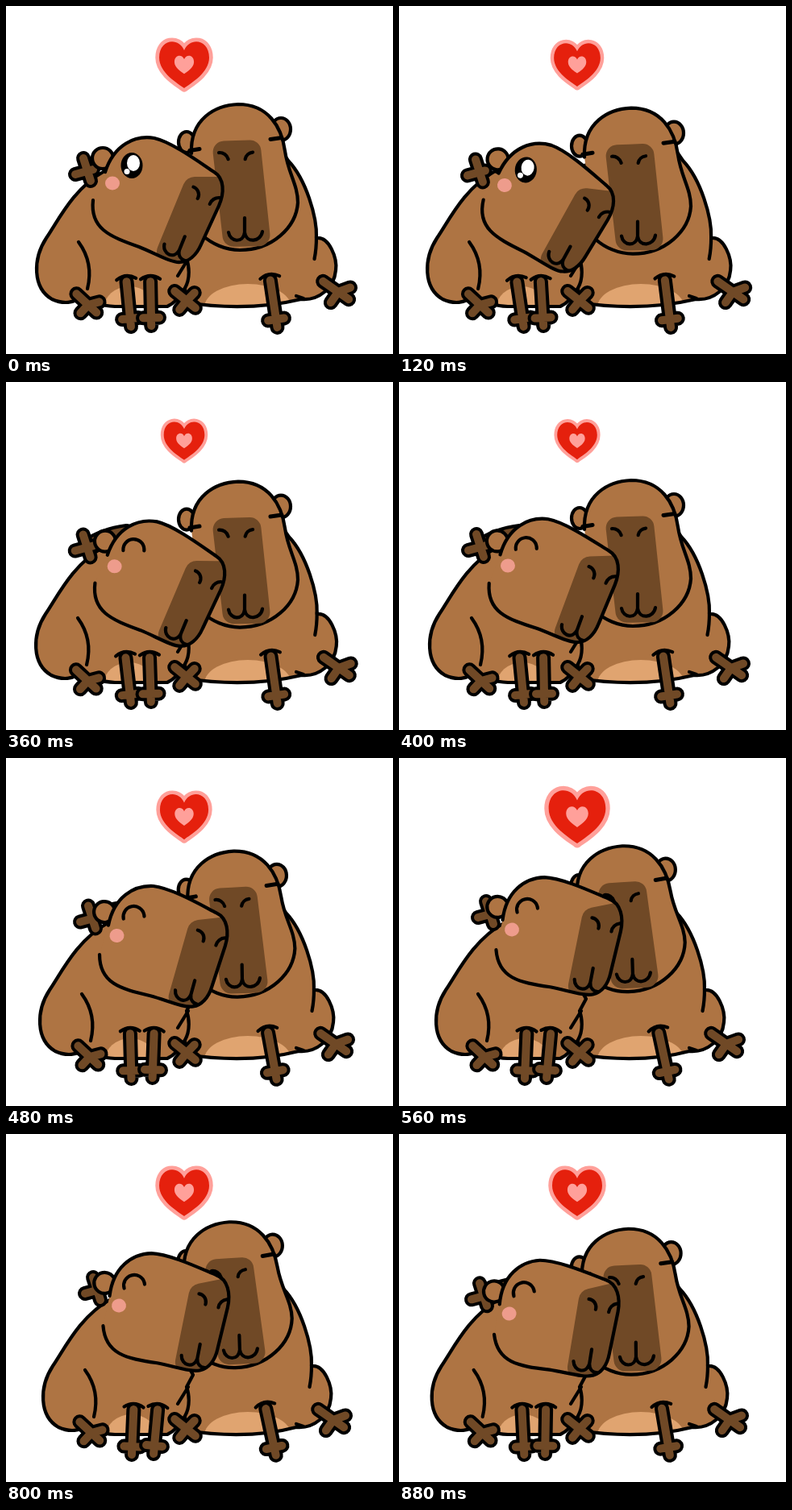
Animation of 480 by 432 pixels, one loop 920 ms. Source, as an HTML page with a canvas:

```html
<!DOCTYPE html>
<html lang="en">
<head>
<meta charset="utf-8">
<title>Cuddling capybaras</title>
<style>
html, body { margin: 0; width: 100%; height: 100%; overflow: hidden; background: #fff; }
canvas { display: block; }
</style>
</head>
<body>
<canvas id="stage" width="480" height="432"></canvas>
<script>
const ctx = document.getElementById('stage').getContext('2d');
const FUR = '#ae7443', DARK = '#704926', BELLY = '#e0a470', INK = '#000';
const RED = '#e5200d', PINK = '#ffa09a', CHEEK = '#ee9c8c';
const LOOP = 920, ASLEEP_FROM = 360;
const STEPS = [0, 120, 200, 360, 400, 480, 520, 560, 680, 800, 840, 880];
const rad = degrees => degrees * Math.PI / 180;

// Straight-line motion through [time, value] keys
function track(time, ...keys) {
  const next = keys.findIndex(([t]) => t > time);
  const [t0, v0] = keys[next - 1], [t1, v1] = keys[next];
  return v0 + (v1 - v0) * (time - t0) / (t1 - t0);
}

function fill(path, color) {
  ctx.fillStyle = color;
  ctx.fill(new Path2D(path));
}

function line(path, width = 4.2, color = INK) {
  ctx.lineWidth = width;
  ctx.strokeStyle = color;
  ctx.stroke(new Path2D(path));
}

function shape(path) {
  fill(path, FUR);
  line(path);
}

function oval(x, y, rx, ry, color) {
  const path = new Path2D();
  path.ellipse(x, y, rx, ry, 0, 0, Math.PI * 2);
  fill(path, color);
  return path;
}

const ear = (x, y, rx, ry) => line(oval(x, y, rx, ry, FUR));

function arc(x, y, r, from, to) {
  const path = new Path2D();
  path.arc(x, y, r, rad(from), rad(to));
  line(path);
}

function roundedPolygon(corners, radius) {
  const path = new Path2D();
  const [a, b] = [corners[0], corners[1]];
  path.moveTo((a[0] + b[0]) / 2, (a[1] + b[1]) / 2);
  corners.forEach((_, i) => {
    const n = corners.length;
    path.arcTo(...corners[(i + 1) % n], ...corners[(i + 2) % n], radius);
  });
  path.closePath();
  return path;
}

function within(path, draw) {
  ctx.save();
  ctx.clip(new Path2D(path));
  draw();
  ctx.restore();
}

function posed(x, y, degrees, draw, pivotX = 0, pivotY = 0) {
  ctx.save();
  ctx.translate(x, y);
  ctx.rotate(rad(degrees));
  ctx.translate(-pivotX, -pivotY);
  draw();
  ctx.restore();
}

function smile(x, y, degrees) {
  posed(x, y, degrees, () => line('M0,-18V0C-2,14-18,12-20,0M0,0C2,14 20,12 22,-1'));
}

function limb(path) {
  line(path, 18, INK);
  line(path, 10, DARK);
}

// A stem arriving at x, y in the given direction, spread into three toes
function foot(x, y, degrees, stem, toe, spread = 90) {
  const tip = (turn, r) => {
    const a = rad(degrees + turn);
    return `M${x},${y}l${r * Math.cos(a)},${r * Math.sin(a)}`;
  };
  limb(tip(180, stem) + tip(-spread, toe) + tip(0, toe) + tip(90, toe));
}

function leg(topX, topY, x, y) {
  const degrees = Math.atan2(y - topY, x - topX) / rad(1);
  foot(x, y, degrees, y - topY - 5, 10);
  posed(topX, topY, degrees - 90, () => line('M-12,2Q0,-6 12,2'));
}

function drawHeart(scale) {
  const half = 'M0,29C-8,23-31,10-31,-9C-31,-32-7,-35 0,-18';
  const both = new Path2D(half);
  both.addPath(new Path2D(half), new DOMMatrix([-1, 0, 0, 1, 0, 0]));
  ctx.save();
  ctx.translate(221, 73);
  ctx.scale(scale, scale);
  line(both, 9.5, PINK);
  fill(both, RED);
  ctx.scale(.39, .39);
  fill(both, PINK);
  ctx.restore();
}

function drawRightBody(shift) {
  const back = 385 + shift;
  const body = `M222,200L${back - 50},170l15,22c22,23 36,70 35,96
    c16,-2 26,25 24,40c-2,22 -21,38 -43,36Q300,380 222,368Z`;
  fill(body, FUR);
  within(body, () => oval(300, 374, 54, 29, BELLY));
  line(body);
  line(`M${back},286q0,16 -2.5,28M360,360l9,3`);
}

function drawRightHead(turn) {
  ear(341, 153, 12, 14);
  ear(224 + 9 * turn, 169, 10, 13);
  shape(`M230,183C228,140 260,123 288,122C325,122 342,150 346,180
    C350,208 362,222 362,244C360,275 330,303 290,303C272,303 255,295 244,285`);
  fill(roundedPolygon([[255, 168], [315, 166], [329, 298], [270, 299]], 14), DARK);
  line('M328,165.5l14,-2M228,179.5l12,-2', 5);
  arc(265, 193, 11, 265, 345);
  arc(307, 192, 10.5, 190, 265);
  smile(296, 281, 0);
}

function drawLeftBody(shift) {
  const x = 50 + shift;
  const body = `M${x + 72},205C${x + 34},226 ${x + 15},266 ${x},288c-17,26 -17,62 7,76
    c13,6 28,6 38,-5Q110,372 135,373H200Q213,367 222,350C229,338 227,322 224,314L232,299L200,240Z`;
  fill(body, FUR);
  within(body, () => oval(153 + shift * .3, 376, 32, 28, BELLY));
  line(body);
  line(`M${x + 40},293q19,26 11,58M213,335L226,314`);
}

function drawEye(asleep) {
  if (asleep) {
    arc(155.5, 199, 13, 175, 365);
  } else {
    oval(156, 198, 13.5, 16, INK);
    oval(158, 195, 8, 10, '#fff');
    oval(150, 205.5, 3.5, 3.5, '#fff');
  }
}

function drawLeftHead(asleep) {
  const head = `M123,206C134,172 160,160 184,164C206,169 240,194 258,206C271,214 271,232 264,248
    L242,296C236,310 226,318 216,318C205,319 185,307 165,299C128,286 104,276 108,241`;
  ear(120, 189, 13, 13);
  fill(head, FUR);
  within(head, () => {
    fill(roundedPolygon([[224, 212], [290, 212], [260, 340], [182, 314]], 15), DARK);
    smile(215, 303, 22);
  });
  line(head);
  oval(132, 220, 9, 8.5, CHEEK);
  drawEye(asleep);
  arc(229, 234, 10, -70, 30);
  arc(264, 250, 12, 200, 275);
}

function drawPaw(x, y, reaching) {
  if (reaching) limb(`M${x},${y}Q120,189 150,185`);
  limb(`M${x - 4},${y - 14}l9,28M${x - 14},${y + 6}l22,-6`);
}

function draw(time) {
  const step = STEPS.findLast(t => t <= time);
  const asleep = Number(step >= ASLEEP_FROM);
  const lift = track(step, [0, 0], [200, -.6], [400, 0], [560, 1], [800, 1], [LOOP, 0]);
  const tilt = track(step, [0, 0], [200, 11], [400, -2], [560, -11], [800, -11], [LOOP, -14]);
  const heart = track(step, [0, 1], [200, .885], [400, .8], [560, 1.14], [800, 1], [LOOP, 1]);
  const raised = Math.max(0, lift);
  const left = 8 * lift, right = -6 * lift;

  ctx.fillStyle = '#fff';
  ctx.fillRect(0, 0, 480, 432);
  ctx.lineCap = ctx.lineJoin = 'round';

  drawHeart(heart);
  drawRightBody(right);
  posed(295 - 8 * raised, 220 - 13 * lift, -1.8 * raised, () => drawRightHead(raised), 295, 220);
  leg(327 + right, 335, 335 + right * .4, 389);
  foot(412 + right, 355, 35, 23, 16, 55);

  drawLeftBody(left);
  drawPaw(100 + 3 * lift + 9 * raised, 203 - 4 * lift - 7 * raised, asleep);
  posed(132 + 3 * asleep + 3 * lift + 2 * raised, 220 + 8 * asleep - 7 * lift - 8 * raised, tilt,
    () => drawLeftHead(asleep), 132, 220);
  leg(149 + left * 1.2, 337, 154 + left * .3, 388);
  leg(179 + left * 1.2, 337, 180 + left * .5, 387);
  foot(102 + left * .5, 371, 43, 20, 14, 58);
  foot(224, 366, 39, 19, 14, 85);
}

function tick(now) {
  draw(now % LOOP);
  requestAnimationFrame(tick);
}

draw(0);
requestAnimationFrame(tick);
</script>
</body>
</html>
```
